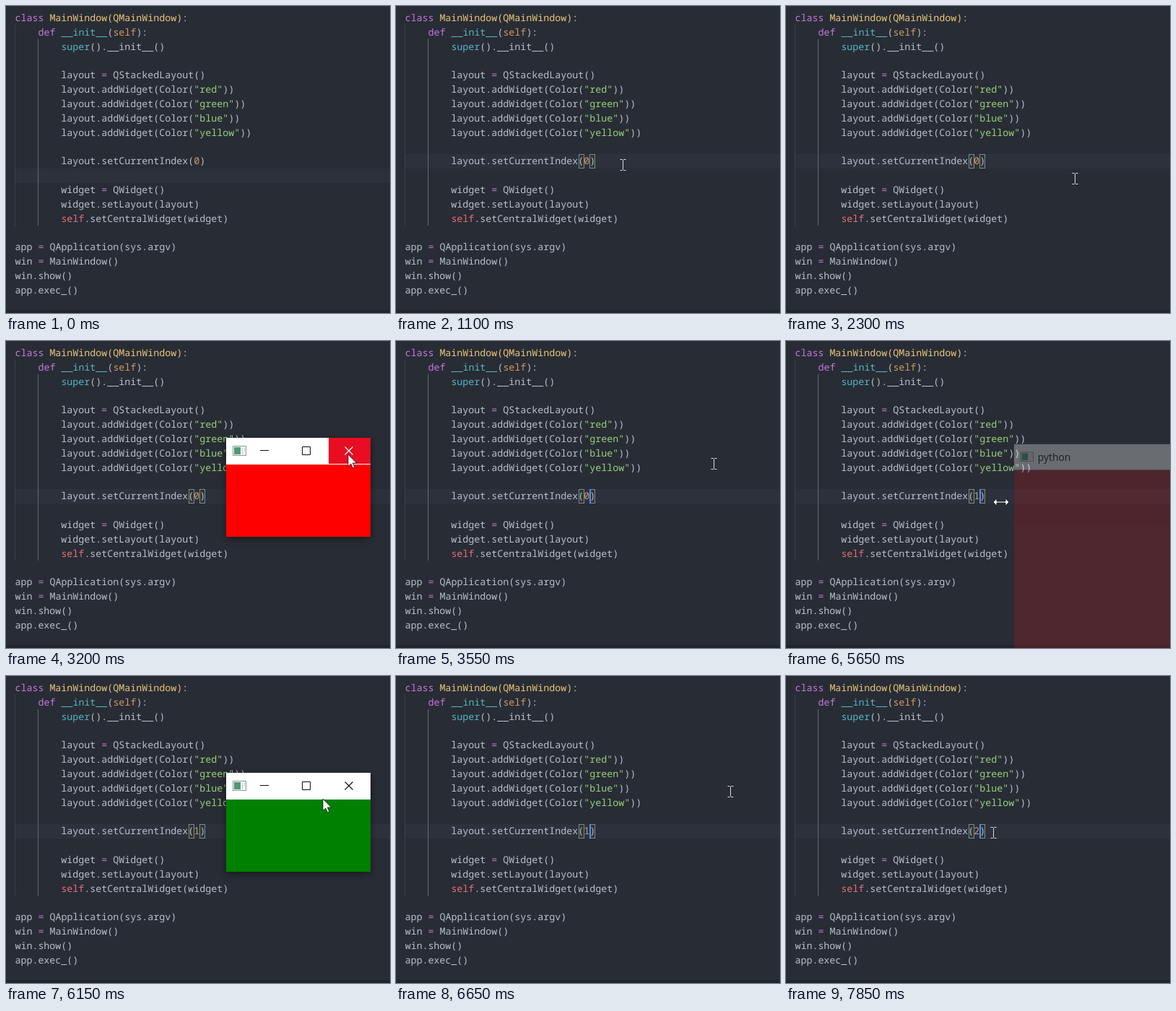
Animation, 532 px wide and 425 px high, one loop 8000 ms. Source, as an HTML page:

```html
<!DOCTYPE html>
<html lang="en">
<head>
<meta charset="utf-8">
<title>Stacked layout demo</title>
<style>
  html, body { margin: 0; width: 100%; height: 100%; overflow: hidden; background: #282c34; }
  svg { display: block; width: 532px; height: 425px; }
  .code text { font: 500 13.333px "Noto Sans Mono", "DejaVu Sans Mono", monospace; white-space: pre; fill: #b9c0cc; text-rendering: geometricPrecision; }
  .title { font: 14.4px "Open Sans", "Noto Sans", sans-serif; }
</style>
</head>
<body>
<svg viewBox="0 0 532 425">
  <defs>
    <filter id="shadow" x="-20%" y="-25%" width="140%" height="160%">
      <feDropShadow dx="0" dy="3" stdDeviation="6" flood-color="#000" flood-opacity=".45"/>
    </filter>
    <g id="icon">
      <rect x="9.5" y="11.5" width="18" height="13" fill="#f4f8f6" stroke="#8b9a97"/>
      <rect x="11" y="13" width="9" height="10" fill="#4f9a72"/>
      <path d="M22.5 14v9M25.5 14v5" stroke="#c3cfca"/>
    </g>
  </defs>
  <rect width="532" height="425" fill="#282c34"/>
  <rect y="421" width="532" height="4" fill="#21252b"/>
  <rect id="row" x="13" width="519" height="20" fill="#2c313c"/>
  <path d="M12.5 26V304" stroke="#3b4048"/>
  <path d="M44.5 46V304" stroke="#646a73"/>
  <g id="brackets" fill="#006400" fill-opacity=".1" stroke="#888">
    <rect x="253.5" y="205.5" width="7" height="19"/>
    <rect id="closing" y="205.5" width="7" height="19"/>
  </g>
  <g id="code" class="code"></g>
  <rect id="caret" y="205" width="2" height="20" fill="#528bff"/>

  <g id="ghost">
    <rect width="640" height="37" fill="#fff"/>
    <rect y="37" width="640" height="480" fill="#a71820"/>
    <use href="#icon"/>
    <text class="title" x="34" y="24">python</text>
  </g>

  <g id="win" filter="url(#shadow)">
    <rect width="200" height="37" fill="#fff"/>
    <rect id="body" y="37" width="200" height="100"/>
    <use href="#icon"/>
    <rect id="hot" x="142" width="58" height="36" fill="#e81123"/>
    <path d="M47 17.5h12M105.5 12.5h11v11h-11z" fill="none" stroke="#111"/>
    <path id="cross" d="M164.5 12.5l11 11m0-11l-11 11" fill="none" stroke-width="1.2"/>
  </g>

  <g id="mouse">
    <path id="beam" d="M-3.5-7.5h3l1 1 1-1h3M.5-6.5v13M-3.5 7.5h3l1-1 1 1h3" fill="none" stroke="#dcdee0"/>
    <path id="arrow" d="M0 0V16.5L3.8 13 6.4 18.8 8.9 17.7 6.3 12H11.6Z" fill="#fff" stroke="#111" stroke-width=".8"/>
    <path id="resize" d="M-11 0l5-5v4h12v-4l5 5-5 5v-4h-12v4z" fill="#fff" stroke="#111" stroke-width=".8"/>
  </g>
</svg>
<script>
const LOOP = 8000, STEP = 50;
const $ = id => document.getElementById(id);
const set = (id, attrs) => { for (const k in attrs) $(id).setAttribute(k, attrs[k]); };
const show = (id, on) => { $(id).style.display = on ? "" : "none"; };
const clamp = v => Math.max(0, Math.min(1, v));

// A segment between tildes starts with its colour key.
const INK = { p: "#c678dd", y: "#e9c67c", c: "#56b6c2", o: "#d19a66", g: "#98d07c", r: "#e8707a" };
const paint = line => line.split("~").map((s, i) =>
  i % 2 ? `<tspan fill="${INK[s[0]]}">${s.slice(1)}</tspan>` : s).join("");
const addColor = name => `        layout.addWidget(Color(~g"${name}"~))`;
const indexLine = n => `        layout.setCurrentIndex(~o${n}~)`;
const LINES = [
  "~pclass~ ~yMainWindow(QMainWindow)~:",
  "    ~pdef~ ~c__init__~(~oself~):",
  "        ~csuper~().__init__()",
  "",
  "        layout ~p=~ QStackedLayout()",
  ...["red", "green", "blue", "yellow"].map(addColor),
  "",
  indexLine(0),
  "",
  "        widget ~p=~ QWidget()",
  "        widget.setLayout(layout)",
  "        ~rself~.setCentralWidget(widget)",
  "",
  "app ~p=~ QApplication(sys.argv)",
  "win ~p=~ MainWindow()",
  "win.show()",
  "app.exec_()"
];
$("code").innerHTML = LINES.map((s, i) =>
  `<text id="line${i}" x="12.4" y="${Math.round(21 + 19.84 * i)}">${paint(s)}</text>`).join("");

const PATH = [
  [150, 349, 361], [500, 257, 214], [650, 257, 214], [850, 259, 207],
  [950, 259, 207], [1300, 400, 239], [2850, 400, 239], [3200, 474, 157],
  [3450, 474, 157], [3800, 300, 224], [5450, 300, 224], [5500, 298, 223],
  [5850, 298, 223], [6270, 474, 157], [6550, 474, 157], [7250, 276, 213],
  [7300, 276, 213], [7500, 287, 217]
];
function mouseAt(t) {
  const i = PATH.findIndex(p => p[0] > t);
  if (i < 1) return PATH[i < 0 ? PATH.length - 1 : 0].slice(1);
  const [a, b] = [PATH[i - 1], PATH[i]];
  const u = (t - a[0]) / (b[0] - a[0]), e = u * u * (3 - 2 * u);
  return [a[1] + (b[1] - a[1]) * e, a[2] + (b[2] - a[2]) * e];
}

// Caret visibility flips at each of these times.
const FLIPS = [700, 1000, 1300, 1650, 1950, 2250, 3500, 3800, 4100, 4650,
  4950, 5250, 5550, 5750, 6550, 6850, 7150, 7450, 7800];
const fade = (t, open, close) => clamp((t - open) / 200) * clamp(1 - (t - close) / 200);

function place(id, p, w, h) {
  const s = 0.951 + 0.049 * p;
  show(id, p > 0);
  set(id, {
    opacity: p,
    transform: `translate(${305 + w / 2 * (1 - s)} ${134 + h / 2 * (1 - s)}) scale(${s})`
  });
}

let shown = "0";
function draw(t) {
  const digit = t < 4150 ? "0" : t < 4300 ? "" : t < 7800 ? "1" : t < 7850 ? "" : "2";
  if (digit !== shown) $("line10").innerHTML = paint(indexLine(shown = digit));
  const end = digit ? 268 : 260;

  set("row", { y: t < 700 ? 225 : 205 });
  show("brackets", t >= 700);
  set("closing", { x: end + 0.5 });
  show("caret", FLIPS.filter(f => f <= t).length % 2);
  set("caret", { x: end });

  const ghost = t <= 5700 ? clamp((t - 5550) / 333) : 0.45 * clamp((5800 - t) / 100);
  const win = t < 5000 ? fade(t, 2300, 3300) : fade(t, 5700, 6400);
  place("ghost", ghost, 640, 517);
  place("win", win, 200, 137);
  set("body", { fill: t < 5000 ? "#f00" : "#008000" });

  const [x, y] = mouseAt(t).map(Math.round);
  const open = win > 0.1;
  const inside = open && x >= 305 && x < 505 && y >= 134 && y < 271;
  const edge = (open || ghost > 0) && x >= 295 && x < 305;
  const hot = inside && x >= 447 && y < 171;
  show("hot", hot);
  set("cross", { stroke: hot ? "#fff" : "#111" });
  show("mouse", t >= 150);
  set("mouse", { transform: `translate(${x} ${y})` });
  show("arrow", inside);
  show("resize", edge);
  show("beam", !inside && !edge);
}

const start = performance.now();
function tick() {
  const t = (performance.now() - start) % LOOP;
  draw(Math.floor(t / STEP) * STEP);
  requestAnimationFrame(tick);
}
tick();
</script>
</body>
</html>
```
